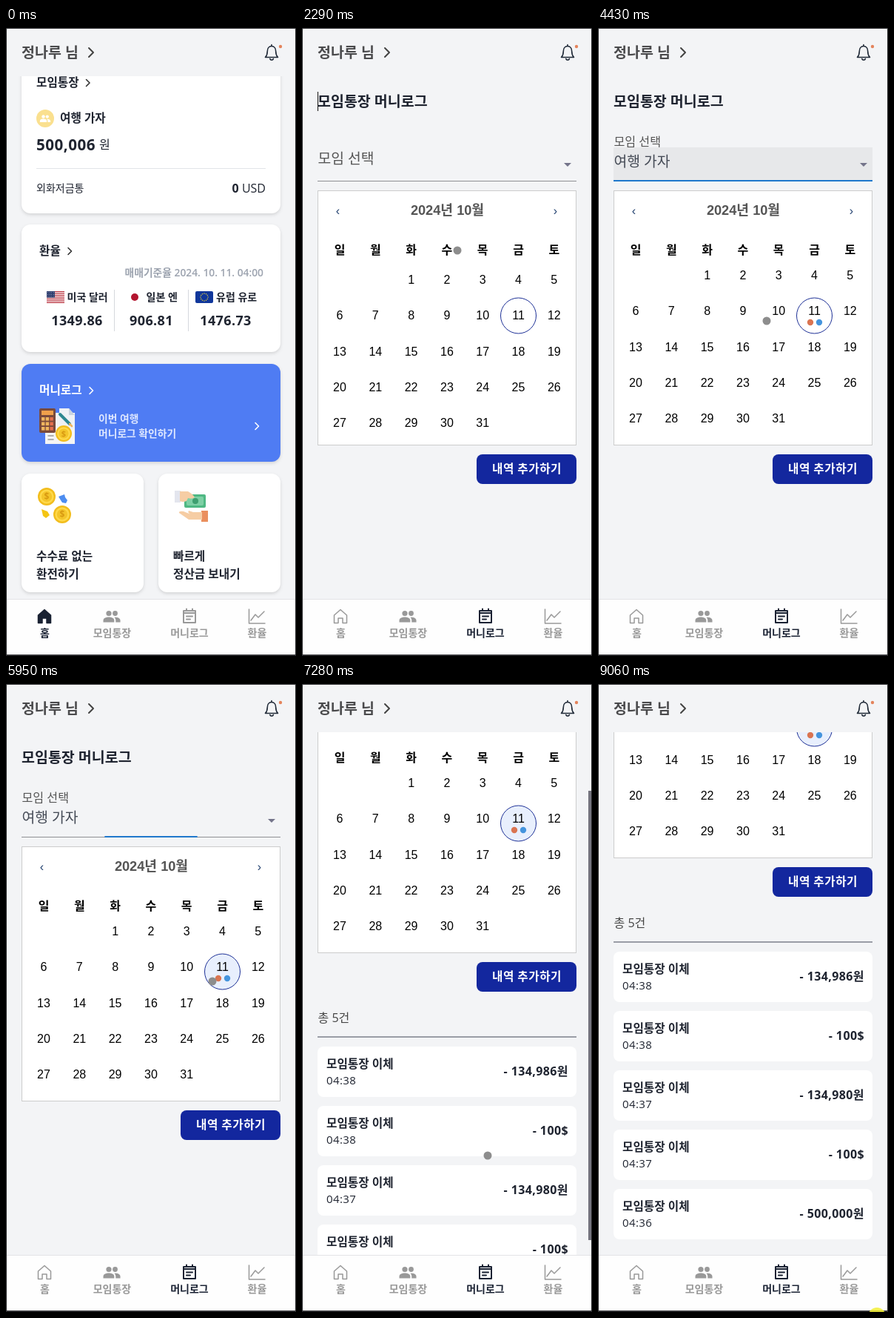
An HTML page for the animation above (9130 ms loop, 392 by 847 pixels).

```html
<!DOCTYPE html>
<html lang="ko">
<head>
<meta charset="utf-8">
<style>
html, body { margin: 0; height: 100%; overflow: hidden; background: #f3f4f6; }
svg { display: block; width: 100vw; height: 100vh; }
text { font-family: 'Open Sans', 'Noto Sans CJK KR', 'Noto Sans KR', 'Noto Sans CJK', sans-serif; fill: #1f2430; white-space: pre; }
.cal text { font-family: 'Liberation Sans', 'Noto Sans CJK KR', 'Noto Sans CJK', sans-serif; fill: #000; }
.b { font-weight: 700; }
.m { font-weight: 600; }
.l { font-weight: 300; }
.e { text-anchor: end; }
.c { text-anchor: middle; }
.n { letter-spacing: .4px; }
text.white { fill: #fff; }
text.pale { fill: #dfe8ff; }
text.gray { fill: #9ca3af; }
.cal text.month { fill: #555; }
.cal text.arrow { fill: #22406f; }
.card { filter: drop-shadow(0 2px 2px rgba(0,0,0,.13)); }
.line { fill: none; stroke-linecap: round; stroke-linejoin: round; }
.tab text { fill: currentColor; }
</style>
</head>
<body>
<svg id="stage" viewBox="0 0 392 847" lang="ko"></svg>
<script>
const LOOP = 9130;
const BODY = 15.7, TITLE = 19.5;
const text = (x, y, size, str, cls = '', more = '') =>
  `<text x="${x}" y="${y}" font-size="${size}" class="${cls}" ${more}>${str}</text>`;
const rect = (x, y, w, h, fill, r = 0, more = '') =>
  `<rect x="${x}" y="${y}" width="${w}" height="${h}" rx="${r}" fill="${fill}" ${more}/>`;
const dot = (x, y, r, fill, more = '') =>
  `<circle cx="${x}" cy="${y}" r="${r}" fill="${fill}" ${more}/>`;
const shape = (d, fill, more = '') => `<path d="${d}" fill="${fill}" ${more}/>`;
const line = (d, color, w = 1.5) =>
  `<path class="line" d="${d}" stroke="${color}" stroke-width="${w}"/>`;
const chevron = (x, y, s = 4.5, color = '#333', w = 1.6) =>
  line(`M${x} ${y - s}l${s} ${s}l${-s} ${s}`, color, w);
const card = (x, y, w, h, r = 12, fill = '#fff') => rect(x, y, w, h, fill, r, 'class="card"');
const many = (n, fn) => Array.from({ length: n }, (_, i) => fn(i)).join('');

const people = (x, y, s, fill) =>
  `<g transform="translate(${x} ${y}) scale(${s})" fill="${fill}">
    <circle cx="-4" cy="-4" r="3.6"/><circle cx="4.5" cy="-4" r="3.4"/>
    <path d="M-11.5 8V5.5C-11.5 2-7 1-4 1S3.3 2 3.3 5.5V8Z"/>
    <path d="M5.3 8V5.5Q5.3 3 3.5 1.3C7 .8 11.5 2 11.5 5.5V8Z"/></g>`;

const coin = (x, y, r = 12) => dot(x, y, r, '#f2bd1d') + dot(x, y, r * .8, '#ffd94a') +
  dot(x, y, r * .6, '#f4c52b') + text(x, y + r * .37, r, '$', 'b c', 'style="fill:#d99a12"');

const usFlag = rect(55, 355, 24, 16, '#fff', 2) +
  many(7, i => rect(55, 355 + i * 2.46, 24, 1.23, '#b8303c')) +
  rect(55, 355, 11, 8.6, '#2f3f70') +
  many(12, i => dot(56.6 + i % 4 * 2.6, 356.7 + (i >> 2) * 2.6, .45, '#fff'));
const euFlag = rect(256, 355, 24, 16, '#10379b', 2) +
  many(12, i => dot(268 + 5 * Math.sin(i * Math.PI / 6), 363 - 5 * Math.cos(i * Math.PI / 6), .75, '#e9ce3a'));

const calculator = rect(53, 519, 40, 42, '#f4f4f4') + shape('M72 513H85L93 522V540H72Z', '#eef1f5') +
  shape('M85 513V522H93Z', '#c9d3df') +
  rect(45, 513, 22, 33, '#7a4a3c', 2) + rect(48, 516, 16, 6, '#f0a04b') +
  many(9, i => rect(48 + i % 3 * 5.7, 525 + (i / 3 | 0) * 6.5, 4.4, 4.6, i % 3 == 2 ? '#e8704d' : '#f0b55e')) +
  line('M73 521L86 534', '#2c8790', 4) + line('M86 534l3 3', '#f0b55e', 2.5) +
  line('M57 550H64M57 555H64', '#999') + coin(78, 547, 11);

const exchange = coin(55, 632) + coin(76, 656) +
  shape('M71 632L79 629L80 633L83 637L81 641L76 640L74 637Z', '#4d8df0') +
  shape('M48 649L56 652L59 657L54 661L50 658Z', '#f4c514');

const handover = rect(241, 629, 29, 18, '#4fb883', 2) + rect(244, 632, 23, 12, '#7ed0a5', 2) + dot(256, 638, 4, '#3f9f70') +
  rect(228, 624, 8, 16, '#e3e5ee') + shape('M235 625H246Q252 628 255 633Q252 636 246 634L244 638Q239 640 235 638Z', '#f6cda4') +
  rect(264, 651, 9, 15, '#ea8f5e') + shape('M265 653H253L247 651Q245 654 250 656L240 652Q233 651 234 654L247 663H265Z', '#f6cda4');

const rate = (x, value) => text(x, 401, 18, value, 'b c n');
const home = card(21, 40, 350, 210) +
  text(41, 79, BODY, '모임통장', 'b') + chevron(108.5, 74) +
  dot(53, 122, 12, '#fae08f') + people(53, 122, .62, '#fff') +
  text(73, 127, BODY, '여행 가자', 'b') +
  text(41, 165, 20.6, '500,006', 'b', 'letter-spacing=".5"') + text(126, 163, 16, '원') +
  rect(41, 189, 310, 1, '#e2e4e8') +
  text(41, 221, 14, '외화저금통') + text(351, 222, 16, '<tspan class="b">0</tspan> USD', 'e') +
  card(21, 265, 350, 172) +
  text(45, 306, BODY, '환율', 'b') + chevron(84, 301) +
  text(348, 335, 13.8, '매매기준율 2024. 10. 11. 04:00', 'm e gray') +
  usFlag + euFlag + dot(174, 363, 5, '#b3152f') +
  text(82.5, 368, 14, '미국 달러', 'm') + text(189.5, 368, 14, '일본 엔', 'm') + text(284, 368, 14, '유럽 유로', 'm') +
  rect(146, 353, 1, 56, '#d5d8dd') + rect(246, 353, 1, 56, '#d5d8dd') +
  rate(96, '1349.86') + rate(196.5, '906.81') + rate(297, '1476.73') +
  card(21, 453, 350, 132, 12, '#4f7cf3') +
  text(45, 494, BODY, '머니로그', 'b white') + chevron(113, 489, 4.5, '#fff') + calculator +
  text(125, 532, 13.8, '이번 여행', 'm pale') + text(125, 552, 13.8, '머니로그 확인하기', 'm pale') +
  chevron(337, 537, 4.5, '#fff') +
  card(21, 601, 165, 160) + card(206, 601, 165, 160) + exchange + handover +
  text(41, 718, BODY, '수수료 없는', 'b') + text(41, 742, BODY, '환전하기', 'b') +
  text(226, 718, BODY, '빠르게', 'b') + text(226, 742, BODY, '정산금 보내기', 'b');

const colX = i => 51 + i * 48.3;
const days = many(31, i => {
  const cell = i + 2;
  return text(colX(cell % 7), 345 + Math.round((cell / 7 | 0) * 48.25), 16, i + 1, 'c');
});
const calendar = `<g class="cal">` + rect(21.5, 219.5, 349, 343, '#fff', 0, 'stroke="#ccc"') +
  text(48.5, 252, 16, '‹', 'c arrow') + text(342.5, 252, 16, '›', 'c arrow') +
  text(196.5, 252, 18.2, '2024년 10월', 'b c month') +
  many(7, i => text(colX(i), 305, 16, '일월화수목금토'[i], 'b c')) +
  dot(292.5, 388, 24, '#fff', 'id="today" stroke="#1c2f96"') +
  `<g id="days">${days}</g></g>` +
  `<g id="marks">${dot(287, 397, 4.2, '#da7451')}${dot(299, 397, 4.2, '#4594dd')}</g>`;

const transfers = [['04:38', '134,986원'], ['04:38', '100$'], ['04:37', '134,980원'], ['04:37', '100$'], ['04:36', '500,000원']];
const list = `<g id="list">` + text(21.5, 656, 16, '총 5건', '', 'style="fill:#444"') + rect(21, 675, 350, 2, '#9a9da6') +
  transfers.map(([time, sum], i) => {
    const y = 689 + i * 80;
    return rect(21, y, 350, 68, '#fff', 8) + text(33, y + 29, BODY, '모임통장 이체', 'b') +
      text(33, y + 51, 15, time, 'n') + text(360, y + 39, 16, '- ' + sum, 'b e n');
  }).join('') + `</g>`;

const log = rect(21, 86, 1, 26, '#111', 0, 'id="caret"') +
  text(21, 106, TITLE, '모임통장 머니로그', 'b') +
  `<g id="label">${text(0, 0, 19.3, '모임 선택', 'l', 'style="fill:#555"')}</g>` +
  rect(21, 161, 350, 46, '#e7e8ea', 0, 'id="field"') +
  text(21.5, 187, 19.3, '여행 가자', 'l', 'id="value" style="fill:#444a55"') +
  rect(21, 206, 350, 1, '#8f9094') + rect(21, 205, 350, 2, '#1f78cc', 0, 'id="under"') +
  shape('M354 182H364L359 187Z', '#74748a') + calendar +
  rect(236, 575, 135, 40, '#13279e', 8) + text(304, 600, BODY, '내역 추가하기', 'b c white', 'letter-spacing=".46"') + list +
  `<g id="menu">${card(21, 207, 350, 64, 4)}${rect(21, 215, 350, 48, '#f1f2f4')}${text(37, 245, 16, '여행 가자')}</g>`;

const house = 'M43.5 802.5V792L52 784.5L60.5 792V802.5H55V796H49V802.5Z';
const tab = (id, x, name, icon) => `<g class="tab" id="${id}">${icon}${text(x, 821, 14, name, 'b c')}</g>`;
const tabs = rect(1, 770, 390, 76, '#fefefe') + rect(1, 770, 390, 1, '#e3e4e6') +
  tab('tabHome', 52.5, '홈', `<path id="house" class="line" d="${house}" stroke="currentColor" stroke-width="1.5"/>`) +
  tab('tabClub', 143.5, '모임통장', people(143, 793.5, 1, 'currentColor')) +
  tab('tabLog', 248, '머니로그', line('M240 786H256V802H240ZM240 789H256M244 783.5V786M252 783.5V786M244 793.5H252M244 797.5H249', 'currentColor', 2)) +
  tab('tabRate', 339.5, '환율', line('M328.5 784V803H350M331 799L337 791L341 795L349 787', 'currentColor'));

const header = text(21, 40, TITLE, '정나루 님', 'b', 'style="fill:#4a4a4c"') + chevron(112, 33, 6, '#444', 2) +
  line('M350.5 39.5c2-2 2.8-4 2.8-8 0-4 2.2-7 5.7-7s5.7 3 5.7 7c0 4 .8 6 2.8 8zM356.8 41.5a2.4 2.4 0 0 0 4.6 0M359 22.5v2', '#1f2937', 1.6) +
  dot(371, 25, 2.2, '#e4845c');

const $ = id => document.getElementById(id);
$('stage').innerHTML =
  `<clipPath id="view"><rect x="1" y="65" width="390" height="705"/></clipPath>` +
  rect(0, 0, 392, 847, '#f3f4f6') +
  `<g clip-path="url(#view)"><g id="home">${home}</g><g id="log">${log}</g></g>` +
  header + tabs + rect(387, 0, 4, 606, '#75757f', 0, 'id="bar"') +
  `<g id="cursor">${dot(0, 0, 5.5, '#8d8d8d')}</g>` +
  shape('M0 0H392V847H0ZM1 1V845H391V1Z', '#2d2d30', 'fill-rule="evenodd"') +
  dot(377, 853, 12, '#f2ee35', 'id="glow" opacity=".85"');

// Keys are [time, ...values]; each stretch eases in and out.
function track(keys, t) {
  const i = keys.findIndex(k => k[0] > t);
  if (i == 0) return keys[0].slice(1);
  if (i < 0) return keys[keys.length - 1].slice(1);
  const a = keys[i - 1], b = keys[i], u = (t - a[0]) / (b[0] - a[0]), s = u * u * (3 - 2 * u);
  return a.slice(1).map((v, j) => v + (b[j + 1] - v) * s);
}
const pointer = [[60, 378, 855], [490, 244, 536], [1400, 244, 536], [1850, 236, 649], [2290, 210, 300],
  [2770, 358, 184], [3100, 358, 184], [3650, 200, 240], [3880, 200, 240], [4430, 228, 395], [4750, 335, 500],
  [5050, 355, 579], [5680, 279, 401], [6200, 279, 401], [6700, 251, 636], [7280, 251, 636], [7600, 273, 631],
  [8100, 273, 631], [8400, 192, 700], [8790, 260, 860]];
const scroll = [[6750, 0], [6950, 100], [7080, 100], [7280, 200], [7430, 200], [7600, 300], [7660, 300], [7900, 328]];
const OPEN = 2900, PICK = 3880, BLUR = 5893, LIST = 6100;

const easeOut = (t, from, ms) => 1 - (1 - Math.min(1, Math.max(0, (t - from) / ms))) ** 3;
const show = (id, on) => $(id).style.display = on ? '' : 'none';
const move = (id, v) => $(id).setAttribute('transform', v);
const fade = (id, v) => $(id).setAttribute('opacity', v);

function draw(t) {
  const onLog = t >= 900, picked = t >= PICK;
  show('home', !onLog);
  show('log', onLog);
  for (const id of ['tabHome', 'tabClub', 'tabLog', 'tabRate'])
    $(id).style.color = id == (onLog ? 'tabLog' : 'tabHome') ? '#1a2233' : '#999';
  $('house').style.fill = onLog ? 'none' : 'currentColor';

  show('caret', t >= 1900 && t < 3700 && Math.floor((t - 1900) / 500) % 2 == 0);
  const up = easeOut(t, OPEN, 200);
  move('label', `translate(21.5 ${183 - 24.5 * up}) scale(${1 - .165 * up})`);
  show('field', t >= OPEN && t < BLUR);
  const wide = up * (1 - easeOut(t, BLUR, 200));
  move('under', `translate(196 0) scale(${wide} 1) translate(-196 0)`);

  const open = easeOut(t, OPEN, 250), shut = easeOut(t, PICK, 200);
  show('menu', t >= OPEN && shut < 1);
  fade('menu', open * (1 - shut));
  move('menu', `translate(196 207) scale(${.75 + .25 * open} ${.56 + .44 * open}) translate(-196 -207)`);

  show('value', picked);
  show('marks', picked);
  move('days', `translate(0 ${picked ? -6 : 0})`);
  $('today').setAttribute('fill', t >= BLUR ? '#e8effd' : '#fff');
  show('list', t >= LIST);

  const top = Math.round(track(scroll, t)[0]);
  move('log', `translate(0 ${-top})`);
  show('bar', t >= 6750 && t < 8500);
  fade('bar', 1 - easeOut(t, 8300, 200));
  $('bar').setAttribute('y', top * .72);

  move('cursor', `translate(${track(pointer, t)})`);
  show('glow', t >= 9060);
}

const start = performance.now();
function tick(now) {
  draw(Math.max(0, now - start) % LOOP);
  requestAnimationFrame(tick);
}
draw(0);
requestAnimationFrame(tick);
</script>
</body>
</html>
```
